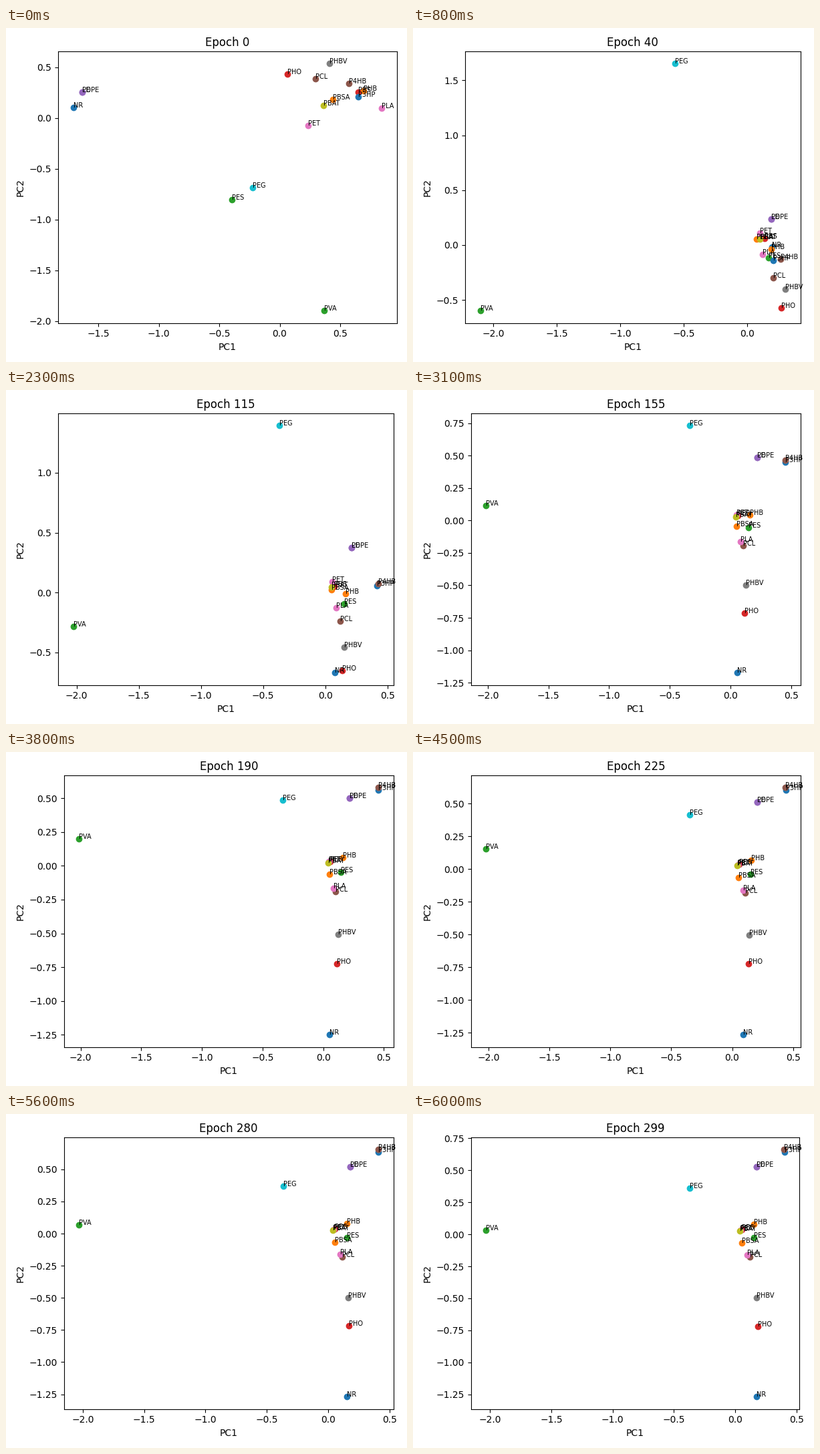
Write a matplotlib script that moves like this. It is 600 px wide and 500 px high and loops after 6100 ms.

```python
import numpy as np
import matplotlib.pyplot as plt
from matplotlib.animation import FuncAnimation

STEP_MS = 100
FRAMES = 61
EPOCH_STEP = 5
LAST_EPOCH = 299

WARMUP = 40        # epochs until the first layout is reached
TURN_FROM = 190    # from here the PCA axes slowly rotate
TURN = 0.095       # radians turned by the last epoch
X_HALF = 55        # epochs after warm-up until PC1 is halfway settled
SLOW, FAST = 90, 74  # the same for PC2
STEEPNESS = 5.5

MARGINS = dict(left=.125, right=.9, bottom=.11, top=.88)
AXES_TOP = .93

POLYETHYLENE = (-1.633, .256), (.187, .238), (.219, .505), FAST

# Name, start, position after warm-up, settled position, PC2 half time.
# The order sets both the colour cycle and the stacking.
POLYMERS = [
    ("NR", (-1.705, .105), (.192, -.018), (.053, -1.275), FAST),
    ("PBSA", (.439, .184), (.071, .055), (.049, -.07), SLOW),
    ("PES", (-.396, -.804), (.166, -.116), (.147, -.041), SLOW),
    ("PBS", (.649, .256), (.134, .061), (.058, .032), SLOW),
    ("LDPE", *POLYETHYLENE),
    ("PCL", (.295, .388), (.203, -.299), (.102, -.187), FAST),
    ("PET", (.234, -.073), (.097, .11), (.048, .027), SLOW),
    ("PHBV", (.411, .533), (.297, -.402), (.125, -.507), FAST),
    ("PBAT", (.361, .125), (.097, .055), (.04, .022), SLOW),
    ("PEG", (-.224, -.686), (-.571, 1.652), (-.335, .388), SLOW + 6),
    ("P3HP", (.649, .21), (.203, -.14), (.457, .6), SLOW),
    ("PHB", (.693, .266), (.187, -.037), (.16, .065), SLOW),
    ("PVA", (.367, -1.898), (-2.103, -.598), (-2.014, .226), SLOW - 8),
    ("PHO", (.063, .434), (.266, -.573), (.114, -.728), FAST),
    ("PE", *POLYETHYLENE),
    ("P4HB", (.571, .342), (.261, -.128), (.457, .62), SLOW),
    ("PLA", (.842, .098), (.118, -.085), (.083, -.168), FAST),
]


def mix(a, b, t):
    return a + (b - a) * t


def settle(epochs, half):
    """S-shaped progress that reaches one half after `half` epochs."""
    a = epochs ** STEEPNESS
    return a / (a + half ** STEEPNESS)


def position(start, middle, end, half, epoch):
    if epoch < WARMUP:
        t = epoch / WARMUP
        ease_out = t * (2 - t)
        return [mix(a, b, ease_out) for a, b in zip(start, middle)]
    since = epoch - WARMUP
    x = mix(middle[0], end[0], settle(since, X_HALF))
    y = mix(middle[1], end[1], settle(since, half))
    angle = np.interp(epoch, [TURN_FROM, LAST_EPOCH], [0, TURN])
    return x - angle * y, y + angle * x  # small-angle rotation


fig, ax = plt.subplots(figsize=(6, 5), dpi=100)


def draw(i):
    epoch = min(i * EPOCH_STEP, LAST_EPOCH)
    ax.clear()
    fig.subplots_adjust(**MARGINS)
    for name, *path in POLYMERS:
        x, y = position(*path, epoch)
        ax.scatter(x, y)
        ax.text(x, y, name, fontsize=7)
    ax.set_title(f"Epoch {epoch}")
    ax.set_xlabel("PC1")
    ax.set_ylabel("PC2")
    fig.tight_layout()
    fig.subplots_adjust(top=AXES_TOP)


anim = FuncAnimation(fig, draw, frames=FRAMES, interval=STEP_MS,
                     init_func=lambda: None, repeat=True, repeat_delay=0)
plt.show()
```
